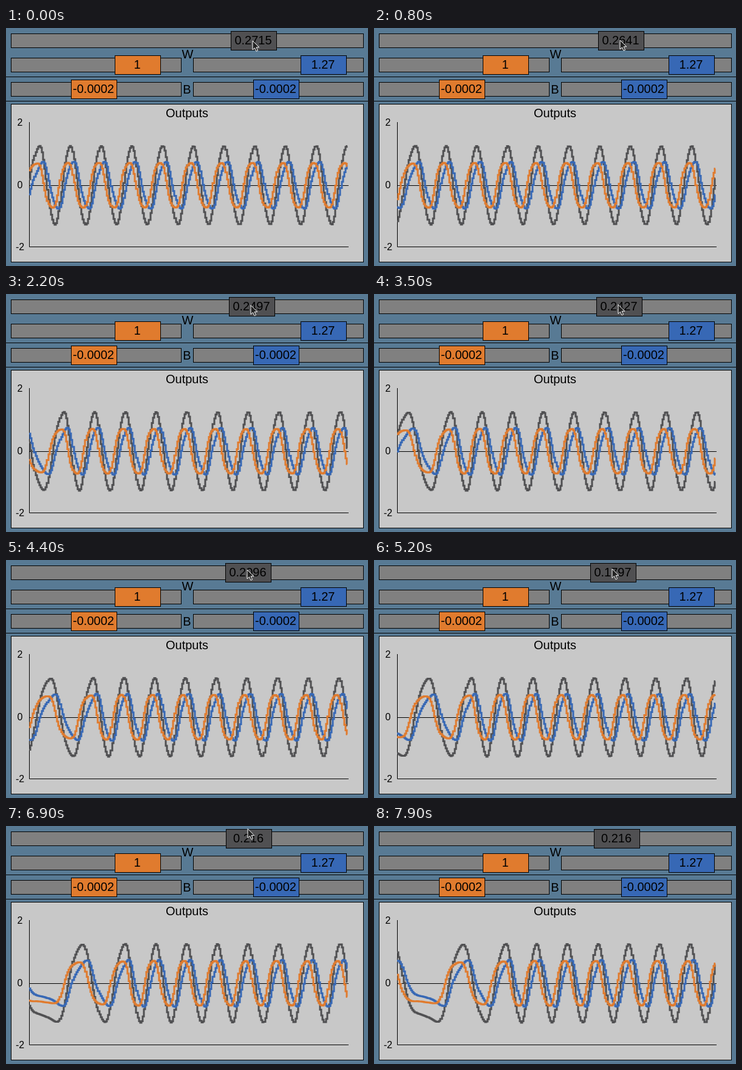
An HTML page that plays this animation: 596 px wide and 392 px high, repeating every 8 s.

```html
<!DOCTYPE html>
<html lang="en">
<head>
<meta charset="utf-8">
<title>Oscillator outputs</title>
<style>
  html, body { margin: 0; width: 100%; height: 100%; overflow: hidden; background: #587a94; }
  svg { display: block; }
  text { font: 20px "Liberation Sans", Arial, sans-serif; text-anchor: middle; }
  .axis text { font-size: 16px; }
  rect, .rule { stroke: #000; }
  .track { fill: #808080; }
  .panel { fill: #c8c8c8; }
  .rule { fill: none; }
  .gray { --c: #505052; }
  .blue { --c: #3768b5; }
  .orange { --c: #e07b2e; }
  .knob rect { fill: var(--c); }
  .trace { fill: none; stroke: var(--c); stroke-width: 3; }
</style>
</head>
<body>
<svg width="596" height="392" viewBox="0 0 596 392">
  <g class="track">
    <rect x="8.5" y="9.5" width="580" height="23"/>
    <rect x="8.5" y="49.5" width="280" height="23"/>
    <rect x="308.5" y="49.5" width="280" height="23"/>
    <rect x="8.5" y="89.5" width="280" height="23"/>
    <rect x="308.5" y="89.5" width="280" height="23"/>
  </g>
  <path class="rule" d="M0 80.5H596M0 120.5H596"/>
  <text x="299" y="49.5">W</text>
  <text x="298" y="108">B</text>

  <g class="knob gray" id="knob"><rect x=".5" y="5.5" width="75" height="31"/><text id="value" x="37" y="26.5"></text></g>
  <g class="knob orange" transform="translate(179 40)"><rect x=".5" y="5.5" width="75" height="31"/><text x="37" y="26.5">1</text></g>
  <g class="knob blue" transform="translate(485 40)"><rect x=".5" y="5.5" width="75" height="31"/><text x="37" y="26.5">1.27</text></g>
  <g class="knob orange" transform="translate(107 80)"><rect x=".5" y="5.5" width="75" height="31"/><text x="37" y="26.5">-0.0002</text></g>
  <g class="knob blue" transform="translate(407 80)"><rect x=".5" y="5.5" width="75" height="31"/><text x="37" y="26.5">-0.0002</text></g>

  <rect class="panel" x="8.5" y="125.5" width="580" height="260"/>
  <text x="298" y="147">Outputs</text>
  <g class="axis">
    <text x="23" y="161">2</text>
    <text x="23" y="264">0</text>
    <text x="23" y="366">-2</text>
  </g>
  <path class="rule" d="M38.5 155V360.5H564M38 259.5H564"/>
  <path class="trace gray" id="sum"/>
  <path class="trace blue" id="b"/>
  <path class="trace orange" id="a"/>
  <path id="cursor" d="M0 0V15L3.5 11.8L6 17.4L8.6 16.2L6.1 10.8H10.8Z" fill="#222" stroke="#fff"/>
</svg>
<script>
const LOOP = 8000, STEP = 100, COUNT = 250, DX = 2.1, UNIT = 53.9, BIAS = -0.0002;
const BEFORE = -10, CYCLE = 24.08, CROSSING = -27.7, EARLY_KNOB = 16.5;

// time in ms, sample number, knob offset in px, cursor height
const keys = [
  [0, 0, 8, 21], [800, 6, 7, 20], [2200, 19, 5, 18.5], [3500, 34, 4, 17.5],
  [4400, 42, -1, 16], [5250, 50, -6, 14.5], [6000, 57, -8, 13.5], [6400, 61, -8, 13.5],
  [6750, 65, 0, 12], [7400, 72, 0, -20], [8000, 78, 0, -20]
];
const drive = [[BEFORE, EARLY_KNOB], [-4, 8], ...keys.map(k => [k[1], k[2]])];

function lerp(rows, x, from, to) {
  let i = 1;
  while (i < rows.length - 1 && rows[i][from] < x) i++;
  const p = rows[i - 1], q = rows[i];
  return p[to] + (q[to] - p[to]) * (x - p[from]) / (q[from] - p[from]);
}

// Sliders are cubic in their position.
const weight = knob => (0.6 + knob / 168.3) ** 3;

// Two neurons, each with its own feedback, coupled with opposite signs.
const next = ([a, b], w) => [
  Math.tanh(a + w * b + BIAS),
  Math.tanh(1.27 * b - w * a + BIAS)
];

// Settled rhythm that fills the chart before the knob moves.
const orbit = [[-0.6, 0]], falls = [];
for (let i = 0; i < 800; i++) {
  const p = orbit[i], q = next(p, weight(EARLY_KNOB));
  orbit.push(q);
  if (i > 300 && p[1] > 0 && q[1] <= 0) falls.push(i + p[1] / (p[1] - q[1]));
}
const period = (falls[falls.length - 1] - falls[0]) / (falls.length - 1);
const middle = falls[falls.length - 3];

function settled(n) {
  const x = middle + (n - CROSSING) * period / CYCLE;
  const i = Math.floor(x), f = x - i;
  return [0, 1].map(k => orbit[i][k] * (1 - f) + orbit[i + 1][k] * f);
}

const samples = [];
for (let n = -COUNT; n <= 80; n++) {
  samples.push(n <= BEFORE
    ? settled(n)
    : next(samples[samples.length - 1], weight(lerp(drive, n, 0, 1))));
}

// Newest sample on the left, drawn as stairs.
function stairs(n, pick) {
  let d = "";
  for (let k = 0; k < COUNT; k++) {
    const x = 38 + Math.round(k * DX);
    const y = (259 - UNIT * pick(samples[n + COUNT - k])).toFixed(1);
    d += k ? `H${x}V${y}` : `M${x} ${y}`;
  }
  return d + "h1";
}

const $ = id => document.getElementById(id);
let shown = -1;

function draw(now) {
  const t = Math.floor(now % LOOP / STEP) * STEP;
  if (t !== shown) {
    shown = t;
    const n = Math.round(lerp(keys, t, 0, 1));
    const knob = Math.round(lerp(keys, t, 0, 2));
    const left = 362 + knob;
    $("knob").setAttribute("transform", `translate(${left} 0)`);
    $("value").textContent = +weight(knob).toFixed(4);
    $("cursor").setAttribute("transform", `translate(${left + 36} ${lerp(keys, t, 0, 3)})`);
    $("sum").setAttribute("d", stairs(n, s => s[0] + s[1]));
    $("b").setAttribute("d", stairs(n, s => s[1]));
    $("a").setAttribute("d", stairs(n, s => s[0]));
  }
}

const start = performance.now();
function loop() {
  draw(performance.now() - start);
  requestAnimationFrame(loop);
}
loop();
</script>
</body>
</html>
```
